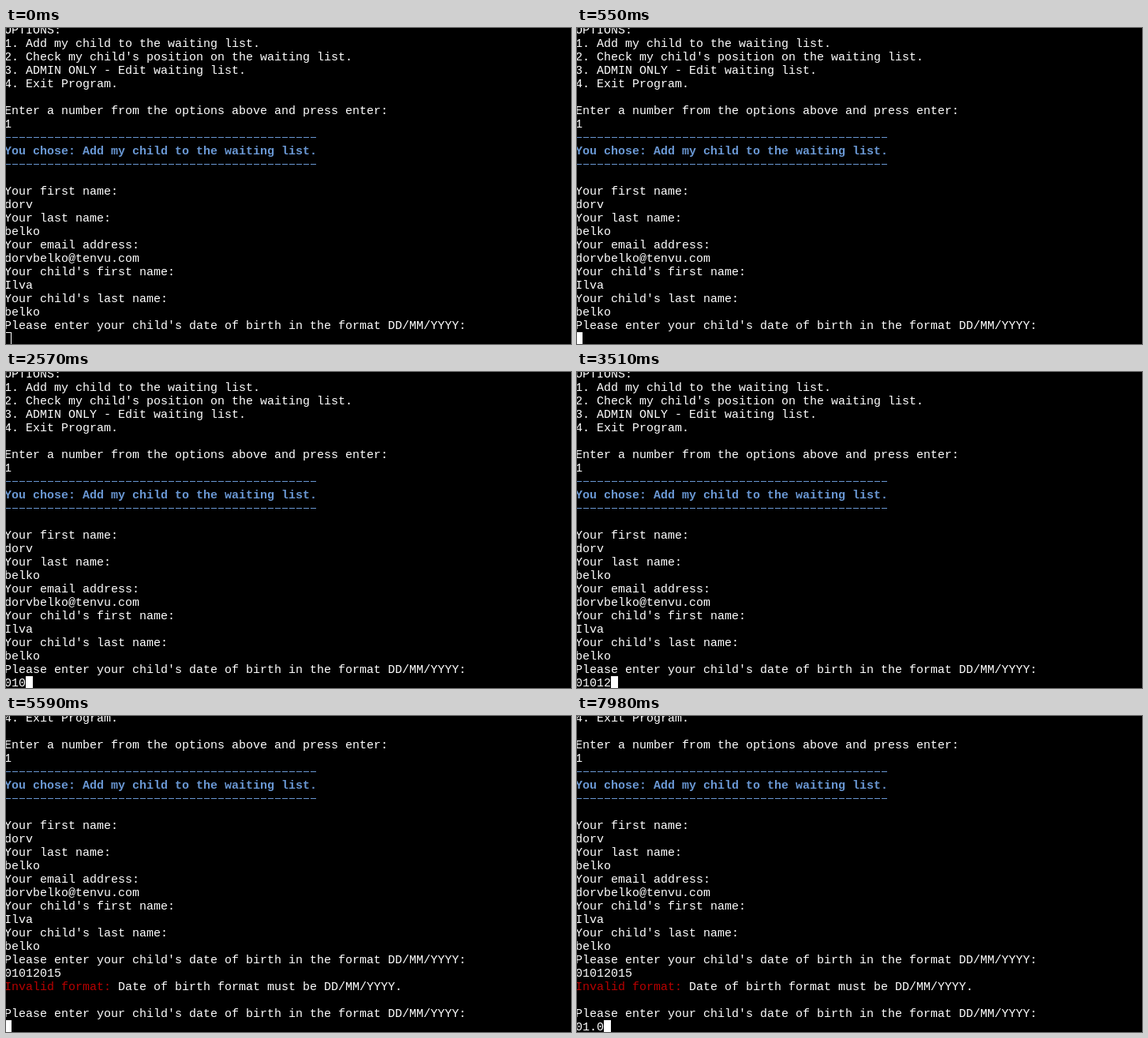
An HTML page with a canvas that plays this animation: 716 px wide and 400 px high, repeating every 8000 ms.

```html
<!DOCTYPE html>
<html lang="en">
<head>
<meta charset="utf-8">
<title>Waiting list terminal</title>
<style>
  html, body { margin: 0; width: 100%; height: 100%; overflow: hidden; background: #000; }
  canvas { display: block; }
</style>
</head>
<body>
<canvas id="screen" width="716" height="400"></canvas>
<script>
const ctx = document.getElementById('screen').getContext('2d');

const LOOP = 8000;
const FOCUS_AT = 300;
const REJECT_AT = 5590;
const CELL = 9, ROW = 17, LEFT = -2, INPUT_TOP = 385, BASELINE = 13;
const WHITE = '#fff', BLUE = '#6a98d4', RED = '#b80000';
const FONT = '15px "Liberation Mono", monospace';

const prompt = "Please enter your child's date of birth in the format DD/MM/YYYY:";
const rule = { dashes: 44 };

const form = [
  'OPTIONS:',
  '1. Add my child to the waiting list.',
  "2. Check my child's position on the waiting list.",
  '3. ADMIN ONLY - Edit waiting list.',
  '4. Exit Program.',
  '',
  'Enter a number from the options above and press enter:',
  '1',
  rule,
  { text: 'You chose: Add my child to the waiting list.', color: BLUE, bold: true },
  rule,
  '',
  'Your first name:',
  'dorv',
  'Your last name:',
  'belko',
  'Your email address:',
  'dorvbelko@tenvu.com',
  "Your child's first name:",
  'Ilva',
  "Your child's last name:",
  'belko',
  prompt
];

const first = { text: '01012015', times: [1550, 1800, 2570, 2800, 3510, 4190, 4400, 4580] };
const second = { text: '01.0', times: [6840, 7020, 7700, 7980] };

const afterReject = [
  ...form,
  first.text,
  [{ text: 'Invalid format:', color: RED }, ' Date of birth format must be DD/MM/YYYY.'],
  '',
  prompt
];

function typed(entry, t) {
  return entry.text.slice(0, entry.times.filter(at => t >= at).length);
}

function drawRule(dashes, top) {
  ctx.fillStyle = BLUE;
  for (let i = 0; i < dashes; i++) {
    ctx.fillRect(LEFT + i * CELL + 1, top + 8, CELL - 2, 1);
  }
}

function drawLine(line, top) {
  if (line.dashes) return drawRule(line.dashes, top);
  let column = 0;
  for (const part of [line].flat()) {
    const { text, color = WHITE, bold = false } = part.text ? part : { text: part };
    ctx.font = (bold ? 'bold ' : '') + FONT;
    ctx.fillStyle = color;
    ctx.fillText(text, LEFT + column * CELL, top + BASELINE);
    column += text.length;
  }
}

function drawCursor(column, focused) {
  const x = LEFT + column * CELL;
  if (focused) {
    ctx.fillStyle = WHITE;
    ctx.fillRect(x, INPUT_TOP, CELL, ROW);
  } else {
    ctx.strokeStyle = WHITE;
    ctx.lineWidth = 1;
    ctx.strokeRect(x + 0.5, INPUT_TOP + 0.5, CELL - 1, ROW - 1);
  }
}

function render(t) {
  const rejected = t >= REJECT_AT;
  const history = rejected ? afterReject : form;
  const input = typed(rejected ? second : first, t);

  ctx.fillStyle = '#000';
  ctx.fillRect(0, 0, 716, 400);
  history.forEach((line, i) => drawLine(line, INPUT_TOP - (history.length - i) * ROW));
  drawLine(input, INPUT_TOP);
  drawCursor(input.length, t >= FOCUS_AT);
}

const start = performance.now();
function tick() {
  render((performance.now() - start) % LOOP);
  requestAnimationFrame(tick);
}
tick();
</script>
</body>
</html>
```
